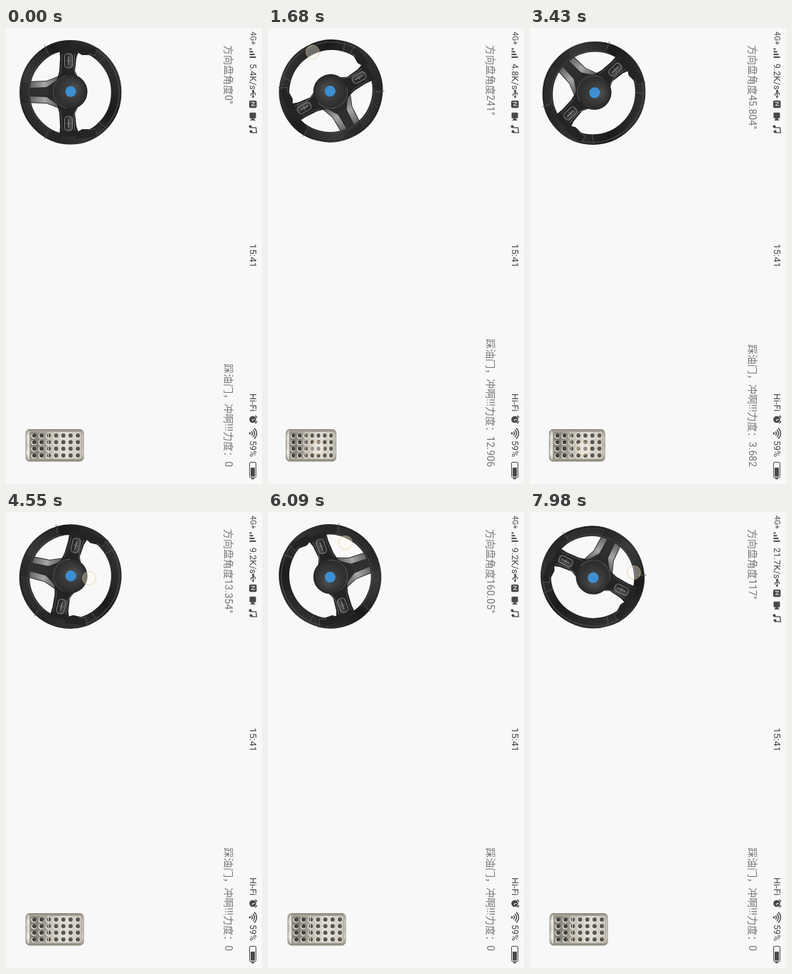
These frames come from a looping animation (360 by 640 pixels, 8 s). An HTML page with a canvas:

```html
<!DOCTYPE html>
<html lang="zh">
<head>
<meta charset="utf-8">
<style>
html, body { margin: 0; width: 100%; height: 100%; overflow: hidden; background: #f8f8f8; }
canvas { display: block; width: 360px; height: 640px; }
</style>
</head>
<body>
<canvas id="stage"></canvas>
<script>
const LOOP = 8000, STEP = 70, TAU = Math.PI * 2;
const FONT = 'Roboto, "Noto Sans CJK SC", "Noto Sans CJK", sans-serif';
const canvas = document.getElementById('stage');
const c = canvas.getContext('2d');
const dpr = window.devicePixelRatio || 1;
canvas.width = 360 * dpr;
canvas.height = 640 * dpr;

const ease = { in: p => p * p, out: p => 1 - (1 - p) * (1 - p), free: p => p, drag: p => p };

// time, angle, kind of move: a finger drag or the springy way back to zero
const turns = [
  [0, 360, 'drag'], [70, 360, 'drag'], [450, 470, 'drag'], [840, 360, 'drag'], [980, 351, 'drag'],
  [1500, 250, 'drag'], [1900, 230, 'drag'], [2380, 308, 'drag'], [2590, 308, 'drag'],
  [3314, 0, 'in'], [3430, 45.804, 'free'], [3711, 92, 'out'], [4108, 0, 'in'],
  [4200, 13.354, 'out'], [4550, 13.354, 'free'], [4620, 5, 'drag'], [4900, -10, 'drag'],
  [5250, -10, 'drag'], [5250, 350, 'drag'], [5320, 350, 'drag'], [5600, 330, 'drag'],
  [6090, 160.05, 'in'], [6160, 160.05, 'free'], [6300, 293, 'drag'], [6580, 250, 'drag'],
  [6860, 250, 'drag'], [7210, 200, 'drag'], [7420, 200, 'drag'], [7980, 117, 'drag'], [LOOP, 117, 'drag']
];
const pushes = [
  [0, 0, 'free'], [70, 0, 'free'], [500, 12.95, 'out'], [980, 12.927, 'free'], [2380, 12.886, 'free'],
  [2548, 12.88, 'free'], [3078, 0, 'in'], [3367, 3.86, 'out'], [3430, 3.682, 'in'],
  [3657, 0, 'in'], [3840, 1.2, 'out'], [4000, 0, 'in'], [LOOP, 0, 'free']
];

function sample(keys, t) {
  const i = Math.max(1, keys.findIndex(k => t <= k[0]));
  const a = keys[i - 1], b = keys[i];
  const p = (t - a[0]) / (b[0] - a[0]);
  return { value: a[1] + (b[1] - a[1]) * ease[b[2]](p), kind: b[2] };
}

const mix = (a, b, p) => a + (b - a) * p;

function poly(points, fill) {
  c.beginPath();
  points.forEach(([x, y]) => c.lineTo(x, y));
  c.closePath();
  c.fillStyle = fill;
  c.fill();
}

function disc(x, y, r, fill) {
  c.beginPath();
  c.arc(x, y, r, 0, TAU);
  c.fillStyle = fill;
  c.fill();
}

function box(x, y, w, h, r, fill, line) {
  c.beginPath();
  c.roundRect(x, y, w, h, r);
  if (fill) { c.fillStyle = fill; c.fill(); }
  if (line) { c.strokeStyle = line; c.stroke(); }
}

function arc(x, y, rx, ry, from, to, color, width) {
  c.beginPath();
  c.ellipse(x, y, rx, ry, 0, from, to);
  c.strokeStyle = color;
  c.lineWidth = width;
  c.stroke();
}

function line(points, color, width) {
  c.beginPath();
  points.forEach(([x, y]) => c.lineTo(x, y));
  c.strokeStyle = color;
  c.lineWidth = width;
  c.stroke();
}

function shade(x0, y0, x1, y1, ...colors) {
  const g = c.createLinearGradient(x0, y0, x1, y1);
  colors.forEach((col, i) => g.addColorStop(i / (colors.length - 1), col));
  return g;
}

function text(str, x, y, size, color, align = 'left', weight = 400) {
  c.font = `${weight} ${size}px ${FONT}`;
  c.textAlign = align;
  c.fillStyle = color;
  c.fillText(str, x, y);
}

function statusBar(t) {
  const ink = '#484848';
  text('4G+', 5, 16.5, 10.5, ink);
  for (let i = 0; i < 4; i++) {
    c.fillStyle = ink;
    c.fillRect(28.5 + i * 3.8, 14.5 - i * 2, 2, 3 + i * 2);
  }
  const speed = t < 450 ? '5.4K/s' : t < 3010 ? '4.8K/s' : t < 6370 ? '9.2K/s' : '21.7K/s';
  text(speed, 50, 17, 12.5, ink);

  c.save();
  c.translate(50 + c.measureText(speed).width, 12.5);
  line([[0.5, 0], [10, 0]], ink, 1.3);
  line([[3, 0], [5, -3], [7.5, -3]], ink, 1.1);
  line([[4, 0], [6, 3], [8.5, 3]], ink, 1.1);
  disc(1.5, 0, 1.6, ink);
  poly([[9, -2], [12, 0], [9, 2]], ink);
  box(15, -5, 10.5, 10.5, 2, ink);
  line([[17.5, 3], [17.5, -2.5], [22, 2.5], [22, -3]], '#eee', 1);
  box(32, -4, 8, 9, 1, ink);
  poly([[39, 0.5], [43, -3.5], [43, 4.5]], ink);
  line([[53, 4], [53, -4], [60, -5], [60, 3]], ink, 1.3);
  disc(51.5, 4, 2, ink);
  disc(58.5, 3, 2, ink);
  c.restore();

  text('15:41', 319.5, 17.5, 13.5, ink, 'center');
  text('Hi-Fi', 513, 17, 12.5, ink);
  disc(549.5, 13, 4.8, ink);
  line([[544, 9.5], [547, 7]], ink, 1.5);
  line([[552, 7], [555, 9.5]], ink, 1.5);
  line([[549.5, 10], [549.5, 13.3], [552, 13.3]], '#eee', 1);
  for (const r of [3.5, 6.5, 9.5]) arc(569, 17, r, r, -Math.PI * 0.78, -Math.PI * 0.22, ink, 1.5);
  disc(569, 17, 1.4, ink);
  text('59%', 579, 17, 12.5, ink);
  c.lineWidth = 1;
  box(609.5, 8.5, 21.5, 9, 1.5, null, ink);
  box(617, 10, 12.5, 6, 0.5, ink);
  c.fillStyle = ink;
  c.fillRect(631.5, 11, 1.8, 4);
}

function sideSpoke(s) {
  c.save();
  c.scale(s, 1);
  poly([[14, -15], [30, -8], [48, -10], [62, -15], [62, 14], [48, 13], [30, 14], [14, 18]], '#242424');
  line([[24, -9], [34, -6], [54, -8]], '#686868', 1);
  line([[24, 13], [34, 11], [54, 10]], '#4c4c4c', 1);
  c.lineWidth = 1;
  box(34, -4.5, 20, 11, 4, shade(34, -5, 34, 7, '#565656', '#1c1c1c'), '#858585');
  line([[38, 1], [50, 1]], '#a0a0a0', 1);
  line([[44, -2], [44, 4]], '#777', 1);
  c.restore();
}

function wheel(angle) {
  c.save();
  c.translate(90, 271);
  c.rotate(angle * Math.PI / 180);

  // lower spoke with metal edges
  poly([[-25, 9], [25, 9], [16, 32], [15, 62], [-15, 62], [-16, 32]], '#2b2b2b');
  for (const s of [-1, 1]) {
    poly([[s * 23, 12], [s * 15, 20], [s * 7, 32], [s * 6, 58], [s * 14, 58], [s * 15, 32]],
      shade(0, 12, 0, 58, '#4a4a4a', '#a6a6a6', '#5a5a5a'));
  }
  poly([[-5, 30], [5, 30], [5, 58], [-5, 58]], '#303030');

  const rim = shade(-55, -55, 50, 60, '#343434', '#1b1b1b', '#333', '#202020');
  arc(0.3, -1.7, 66, 64.4, 0, TAU, rim, 14.6);
  for (const s of [-1, 1]) {
    poly([[s * 61, -42], [s * 49, -37], [s * 52, -29], [s * 52, -18], [s * 56, -11], [s * 66, -9]], '#242424');
    sideSpoke(s);
    line([[s * 62, -41], [s * 51, -36], [s * 54, -27]], '#555', 0.9);
    line([[s * 51, -53], [s * 43, -42]], '#5c5c5c', 0.8);
    line([[s * 54, 30], [s * 66, 35]], '#515151', 0.8);
  }

  // sheen and perforated leather
  arc(0.3, -1.7, 70, 68.4, -2.6, -0.55, '#454545', 1.4);
  arc(0.3, -1.7, 60.5, 58.9, 0.45, 2.7, '#444', 1);
  c.setLineDash([0.9, 1.7]);
  for (let r = 62; r <= 71; r += 2.5) {
    arc(0.3, -1.7, r, r - 1.6, 0.5, 1.35, '#686868', 0.9);
    arc(0.3, -1.7, r, r - 1.6, 1.8, 2.65, '#686868', 0.9);
  }
  c.setLineDash([]);

  const hub = c.createRadialGradient(-6, -8, 3, 0, 0, 26);
  hub.addColorStop(0, '#4a4a4a');
  hub.addColorStop(0.85, '#2c2c2c');
  hub.addColorStop(1, '#171717');
  disc(-0.5, -1, 24.5, hub);
  arc(-0.5, -1, 23.5, 23.5, 0.2, 2.9, '#5d5d5d', 0.9);
  disc(-0.8, -2, 7.6, '#3c8fd2');
  c.restore();
}

function pedal(force) {
  const p = force / 12.9;
  const top = mix(250.5, 264, p), bottom = mix(332.5, 335, p);
  c.save();
  c.translate(563, top);
  c.scale(1, (bottom - top) / 82);
  c.lineWidth = 1;
  box(0.5, 0.5, 44.5, 81, 5, shade(0, 0, 45, 0, '#8d877c', '#dedad2', '#c9c4ba', '#ece9e3', '#8a8376'), '#8f897f');
  box(3.5, 3, 38.5, 73, 3, shade(0, 3, 0, 76, '#c8c3b8', '#e2dfd8', '#bdb7ab', '#8e897e'), '#a9a397');
  box(5, 51, 35.5, 23, 2, shade(0, 51, 0, 74, '#a8a398', '#77736b'));
  for (let row = 0; row < 7; row++) {
    for (let col = 0; col < 4; col++) {
      const x = 9 + col * 9.3, y = 8.5 + row * 10.2;
      disc(x + 0.5, y + 0.6, 3.7, '#eeeae2');
      disc(x, y, 3, row > 4 ? '#45423e' : '#5a554f');
    }
  }
  line([[3, 50], [42, 50]], '#d8d4ca', 1);
  line([[2.5, 78], [42.5, 78]], '#f0ede7', 1.2);
  c.restore();
}

function finger(x, y) {
  disc(x, y, 9.5, 'rgba(255,252,240,0.35)');
  arc(x, y, 9.5, 9.5, 0, TAU, 'rgba(226,194,130,0.6)', 1);
}

function slide(t, track) {
  const i = track.findIndex(k => t <= k[0]);
  if (i < 0 || t < track[0][0]) return;
  const a = track[Math.max(0, i - 1)], b = track[i];
  const p = b === a ? 0 : (t - a[0]) / (b[0] - a[0]);
  finger(mix(a[1], b[1], p), mix(a[2], b[2], p));
}

function fingers(t, angle) {
  if (t >= 70 && t < 2590) {
    const r = mix(71, 53, Math.min(1, Math.max(0, (t - 980) / 1400)));
    const a = (angle + 4) * Math.PI / 180;
    finger(89 + r * Math.cos(a), 90 + r * Math.sin(a));
  }
  slide(t, [[4200, 117, 93], [4550, 117, 93], [4900, 120, 86], [5320, 120, 86], [5600, 114, 72]]);
  slide(t, [[6090, 109, 43], [6160, 109, 43], [6580, 120, 55], [6860, 120, 55], [7980, 146, 85], [LOOP, 146, 85]]);
  slide(t, [[70, 62, 587], [980, 62, 587], [2380, 77, 592], [2520, 77, 592]]);
  slide(t, [[3360, 75, 590], [3500, 75, 590]]);
}

function draw(t) {
  const turn = sample(turns, t);
  const force = sample(pushes, t).value;
  const angle = (turn.value + 360) % 360;
  const shown = turn.kind === 'drag' ? Math.round(angle) % 360 : +angle.toFixed(3);

  c.setTransform(dpr, 0, 0, dpr, 0, 0);
  c.fillStyle = '#f8f8f8';
  c.fillRect(0, 0, 360, 640);

  // the phone is held sideways
  c.save();
  c.translate(360, 0);
  c.rotate(Math.PI / 2);
  statusBar(t);
  text(`方向盘角度${shown}°`, 24, 52, 14, '#777');
  text(`踩油门，冲啊!!!力度：${+force.toFixed(3)}`, 616, 52, 14, '#777', 'right');
  wheel(angle);
  pedal(force);
  c.restore();

  fingers(t, turn.value);
}

const start = performance.now();
function tick() {
  const t = (performance.now() - start) % LOOP;
  draw(Math.floor(t / STEP) * STEP);
  requestAnimationFrame(tick);
}
tick();
</script>
</body>
</html>
```
